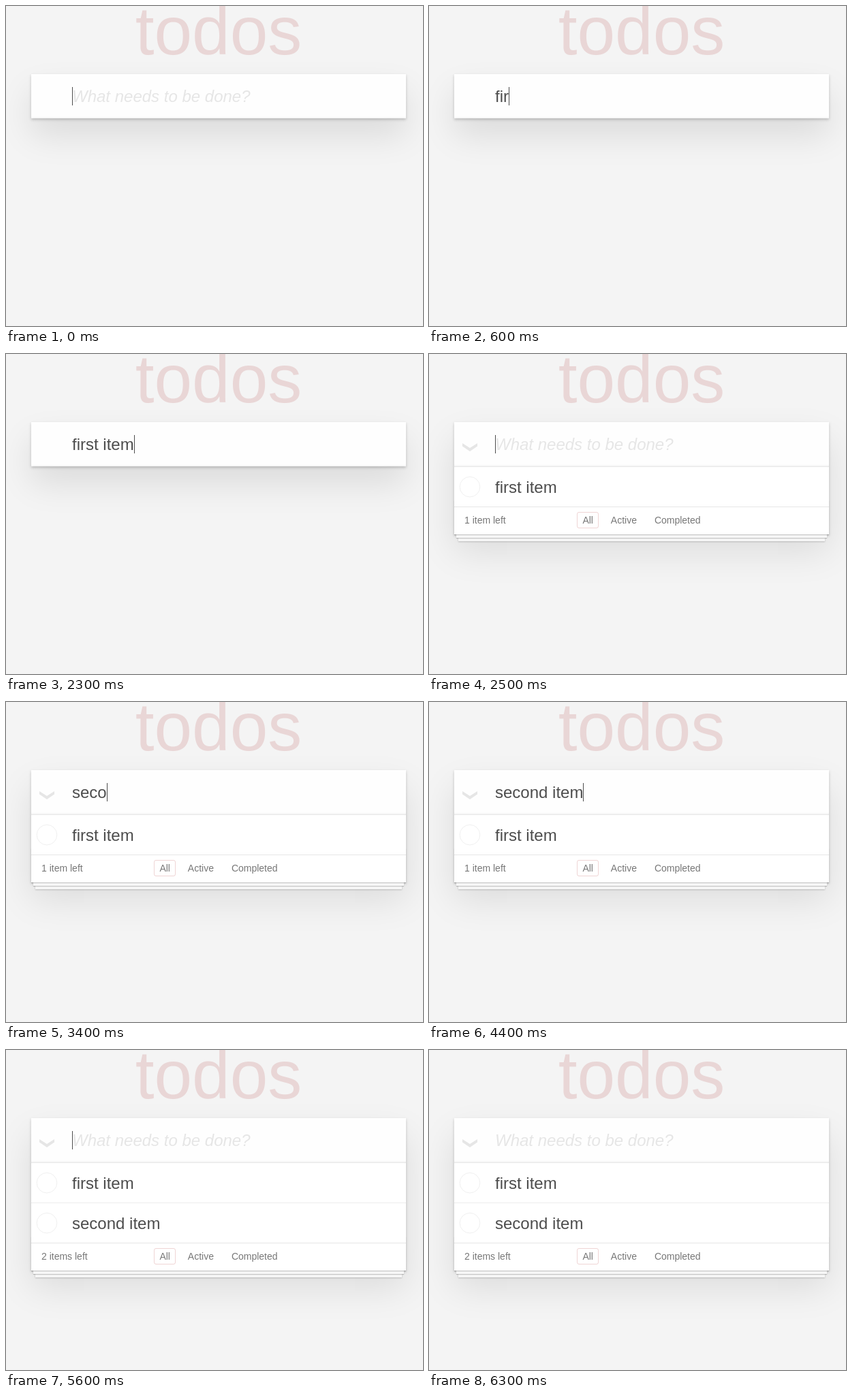
Animation, 612 px wide and 470 px high, one loop 6400 ms. Source, as an HTML page:

```html
<!DOCTYPE html>
<html lang="en">
<head>
<meta charset="utf-8">
<title>todos</title>
<style>
* { box-sizing: border-box; }
html, body { margin: 0; width: 100%; height: 100%; overflow: hidden; }
body {
  position: relative;
  background: #f4f4f4;
  color: #4d4d4d;
  font: 14px "Liberation Sans", Arial, sans-serif;
  -webkit-font-smoothing: antialiased;
}
h1 {
  position: absolute; left: 37px; top: 27px; width: 550px; margin: 0;
  font-size: 100px; font-weight: 400; line-height: 19.6px; text-align: center;
  color: rgba(175, 47, 47, .15);
}
#app {
  position: absolute; left: 37px; top: 100px; width: 550px;
  background: #fff;
  box-shadow: 0 2px 4px rgba(0, 0, 0, .2), 0 25px 50px rgba(0, 0, 0, .1);
}
#input, .row { position: relative; padding-left: 60px; font-size: 24px; line-height: 27px; white-space: pre; }
#input {
  height: 65px; padding-top: 19px;
  background: rgba(0, 0, 0, .003);
  box-shadow: inset 0 -2px 1px rgba(0, 0, 0, .03);
}
#caret { position: absolute; width: 1px; height: 27px; background: #4d4d4d; }
#hint { font-style: italic; color: #e6e6e6; }
svg { position: absolute; left: 0; width: 40px; height: 40px; }
#arrow { top: 20px; }
.row { height: 59px; padding-top: 16px; border-top: 1px solid #ededed; }
.row svg { top: 9px; }
#first { height: 59px; border-color: #e6e6e6; }
footer {
  position: relative; height: 41px; padding: 10px 15px;
  border-top: 1px solid #e6e6e6;
  line-height: 18px; text-align: center; color: #777;
}
footer::before {
  content: ""; position: absolute; left: 0; right: 0; bottom: 0; height: 50px;
  box-shadow: 0 1px 1px rgba(0, 0, 0, .2),
    0 8px 0 -3px #f6f6f6, 0 9px 1px -3px rgba(0, 0, 0, .2),
    0 16px 0 -6px #f6f6f6, 0 17px 2px -6px rgba(0, 0, 0, .2);
}
#count { position: absolute; left: 15px; }
#filters { position: absolute; left: 0; right: 0; }
#filters span { margin: 3px; padding: 3px 7px; border: 1px solid transparent; border-radius: 3px; }
#filters .on { border-color: rgba(175, 47, 47, .2); }
[hidden] { display: none !important; }
</style>
</head>
<body>
<h1>todos</h1>
<div id="app">
  <div id="input"><svg id="arrow"><path fill="#e6e6e6" d="M12 11L23 18L34 11V15.5L23 23L12 15.5Z"/></svg><span id="typed"></span><span id="caret"></span><span id="hint">What needs to be done?</span></div>
  <div class="row" id="first"><svg viewBox="-10 -18 100 135"><circle cx="50" cy="50" r="50" fill="none" stroke="#ededed" stroke-width="3"/></svg>first item</div>
  <div class="row" id="second"><svg viewBox="-10 -18 100 135"><circle cx="50" cy="50" r="50" fill="none" stroke="#ededed" stroke-width="3"/></svg>second item</div>
  <footer id="foot">
    <span id="count"></span>
    <div id="filters"><span class="on">All</span> <span>Active</span> <span>Completed</span></div>
  </footer>
</div>
<script>
const LOOP = 6400;
const $ = id => document.getElementById(id);

// [start in ms, text in the input]
const typing = [
  [0, ''], [500, 'fi'], [600, 'fir'], [1100, 'first'], [1400, 'first '],
  [1900, 'first it'], [2000, 'first ite'], [2300, 'first item'], [2500, ''],
  [2700, 's'], [3100, 'se'], [3400, 'seco'], [3500, 'secon'], [3700, 'second'],
  [3800, 'second '], [3900, 'second it'], [4000, 'second ite'],
  [4400, 'second item'], [4500, '']
];
const caretOff = [[300, 500], [5000, 5600], [6300, LOOP]];
const submits = [2500, 4500];

function draw() {
  const t = performance.now() % LOOP;
  const text = typing.filter(([start]) => t >= start).pop()[1];
  const items = submits.filter(start => t >= start).length;

  $('typed').textContent = text;
  $('hint').hidden = text !== '';
  $('caret').hidden = caretOff.some(([from, to]) => t >= from && t < to);
  $('first').hidden = $('foot').hidden = items < 1;
  $('arrow').style.display = items ? '' : 'none';
  $('second').hidden = items < 2;
  $('count').textContent = `${items} item${items === 1 ? '' : 's'} left`;
  requestAnimationFrame(draw);
}
draw();
</script>
</body>
</html>
```
